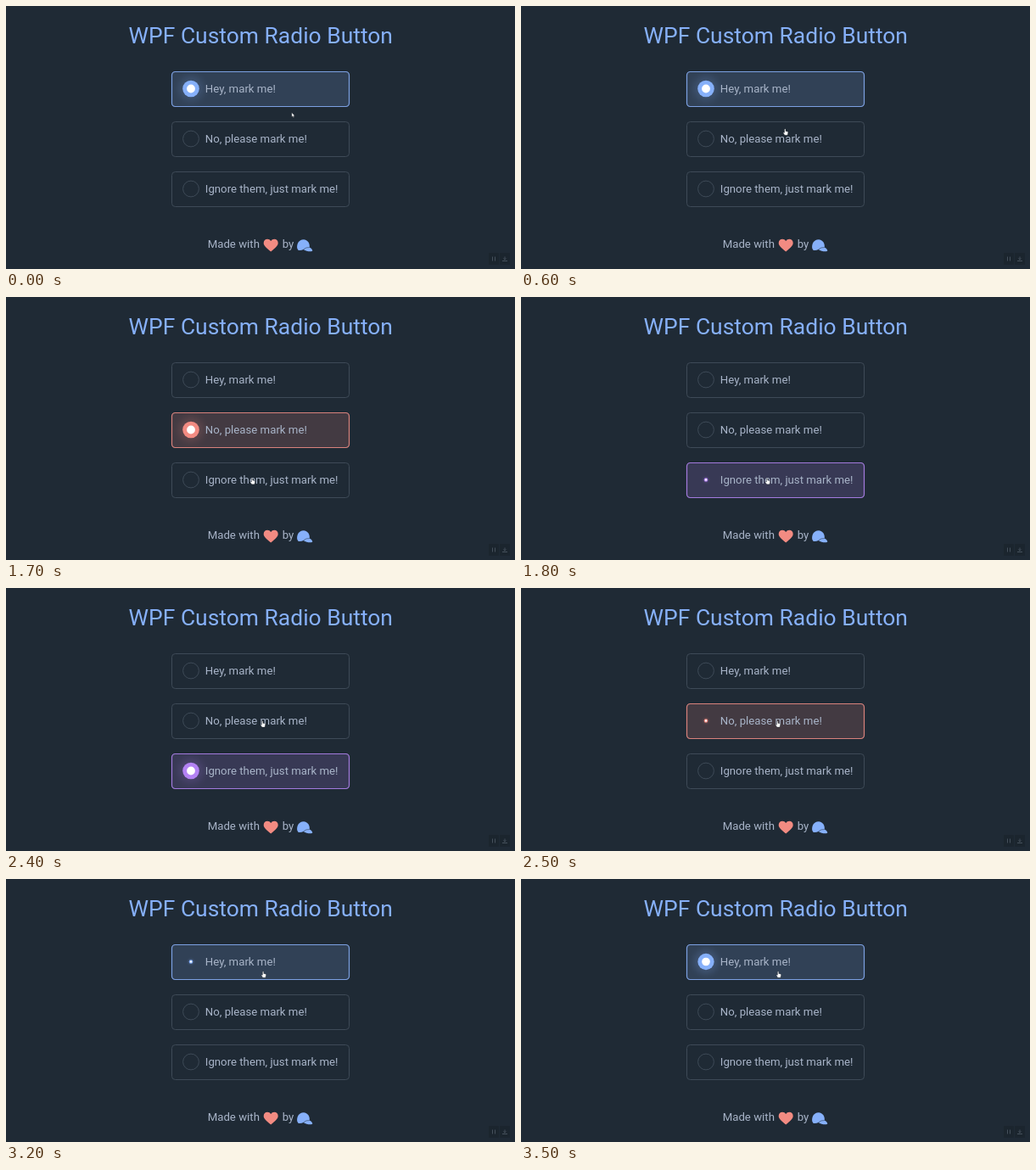
These frames come from a looping animation (600 px wide and 310 px high, 3600 ms). An HTML page:

```html
<!DOCTYPE html>
<html lang="en">
<head>
<meta charset="utf-8">
<title>WPF Custom Radio Button</title>
<style>
  html, body { margin: 0; width: 100%; height: 100%; overflow: hidden; background: #1f2a35; }
  svg { display: block; width: 100%; height: 100%; }
  text { font-family: Roboto, "Open Sans", sans-serif; font-size: 13.23px; fill: #a8b4c8; }
  .title { font-size: 26.45px; fill: #86b0fa; text-anchor: middle; }
  .box, .ring { fill: none; stroke: #3e4a57; }
  .on { visibility: hidden; }
  .sel .on { visibility: visible; }
  .sel .ring { visibility: hidden; }
  .tint { fill: var(--c); fill-opacity: .17; stroke: var(--c); stroke-width: 1.2; stroke-opacity: .85; }
  .glow { fill: var(--c); filter: blur(4px); opacity: .15; }
  .dot { fill: var(--c); }
</style>
</head>
<body>
<svg viewBox="0 0 600 310">
  <rect width="600" height="310" fill="#1f2a35"/>
  <text class="title" x="300.3" y="44.3">WPF Custom Radio Button</text>
  <g id="rows"></g>

  <text x="237.7" y="284.8">Made with</text>
  <path fill="#f28b82" d="M312.2 289.4 C307 285 303.7 282.6 303.7 279.2 Q304 275 308.2 274.8 Q310.8 274.9 312.2 276.9 Q313.6 274.9 316.2 274.8 Q320.4 275 320.7 279.2 C320.7 282.6 317.4 285 312.2 289.4 Z"/>
  <text x="325.7" y="284.8">by</text>
  <path fill="#86b0fa" d="M343.2 285.5 C342.6 279 346 275.4 350.6 275.2 C356 275.6 358.4 280 357.8 284.6 Q361.6 286.8 361.2 288.8 C358.6 290 353.6 289 350.6 286.9 Q347.6 288.6 344.4 287.8 Z"/>
  <path fill="none" stroke="#1f2a35" stroke-width=".5" d="M350.6 286.9 Q354 284 357.8 284.6"/>

  <g fill="#1b252e">
    <rect x="569" y="291" width="12" height="14" rx="1"/>
    <rect x="582" y="291" width="12" height="14" rx="1"/>
  </g>
  <path d="M573.5 295.5v5M576.5 295.5v5M588 295.5v3.5M586.4 297.6l1.6 1.6l1.6-1.6M585 300.5h6" fill="none" stroke="#46515c"/>

  <g id="cursor" fill="#fff" stroke="#10161c" stroke-width=".4">
    <path id="arrow" d="M0 0V5.2L1.2 4.1L2 5.9L2.9 5.5L2.1 3.8H3.7Z"/>
    <path id="hand" transform="translate(.3 .3) scale(.88)" d="M-.8 .7Q0-.4 .8 .7V3.2L3.4 3.8Q4.2 4.1 4 5.2L3.3 8.6H-.5L-2.4 5.7Q-2.4 4.5-.8 5.3Z"/>
  </g>
</svg>
<script>
  const LOOP = 3600, STEP = 100, PITCH = 59, TOP = 77.5, HEIGHT = 41;
  const $ = id => document.getElementById(id);

  const options = [
    ["Hey, mark me!", "#86b0fa"],
    ["No, please mark me!", "#f28b82"],
    ["Ignore them, just mark me!", "#b382f4"]
  ];
  const box = cls => `<rect class="${cls}" x="195.5" y="${TOP}" width="209" height="${HEIGHT}" rx="4"/>`;
  $("rows").innerHTML = options.map(([label, color], i) => `
    <g class="row" style="--c:${color}" transform="translate(0 ${i * PITCH})">
      ${box("box")}${box("tint on")}
      <circle class="ring" cx="218" cy="97.5" r="9.4"/>
      <g transform="translate(218 97.5)"><g class="mark on">
        <circle class="glow" r="15"/>
        <circle class="dot" r="9.8"/>
        <circle r="4.9" fill="#fff"/>
      </g></g>
      <text x="234.8" y="102.1">${label}</text>
    </g>`).join("");
  const rows = [...document.querySelectorAll(".row")];
  const marks = rows.map(row => row.querySelector(".mark"));

  const clicks = [
    { at: -LOOP, row: 0 }, { at: 1000, row: 1 }, { at: 1800, row: 2 },
    { at: 2500, row: 1 }, { at: 3200, row: 0 }
  ];

  // Each move glides the pointer tip from wherever it rests
  const home = { x: 336.8, y: 125.6 };
  const moves = [
    { from: 0, to: 600, x: 311, y: 144.4 },
    { from: 1200, to: 1600, x: 289.8, y: 213 },
    { from: 2100, to: 2400, x: 301.9, y: 156.2 },
    { from: 2600, to: 3000, x: 302.8, y: 108.3 }
  ];

  const easeOut = k => 1 - (1 - Math.min(Math.max(k, 0), 1)) ** 2;

  const pointerAt = t => moves.reduce((p, m) => {
    const k = easeOut((t - m.from) / (m.to - m.from));
    return { x: p.x + (m.x - p.x) * k, y: p.y + (m.y - p.y) * k };
  }, home);

  const show = (el, on) => el.setAttribute("visibility", on ? "visible" : "hidden");

  function draw(time) {
    const t = Math.floor((time % LOOP) / STEP) * STEP;

    const { at, row: selected } = clicks.findLast(c => c.at <= t);
    rows.forEach((row, i) => row.classList.toggle("sel", i === selected));
    marks[selected].setAttribute("transform", `scale(${easeOut((t - at + 50) / 400)})`);

    const { x, y } = pointerAt(t);
    const offset = (y - TOP) % PITCH;
    const over = offset >= 0 && offset <= HEIGHT;
    $("cursor").setAttribute("transform", `translate(${x} ${y})`);
    show($("hand"), over);
    show($("arrow"), !over);
  }

  const start = performance.now();
  function tick() {
    draw(performance.now() - start);
    requestAnimationFrame(tick);
  }
  tick();
</script>
</body>
</html>
```
